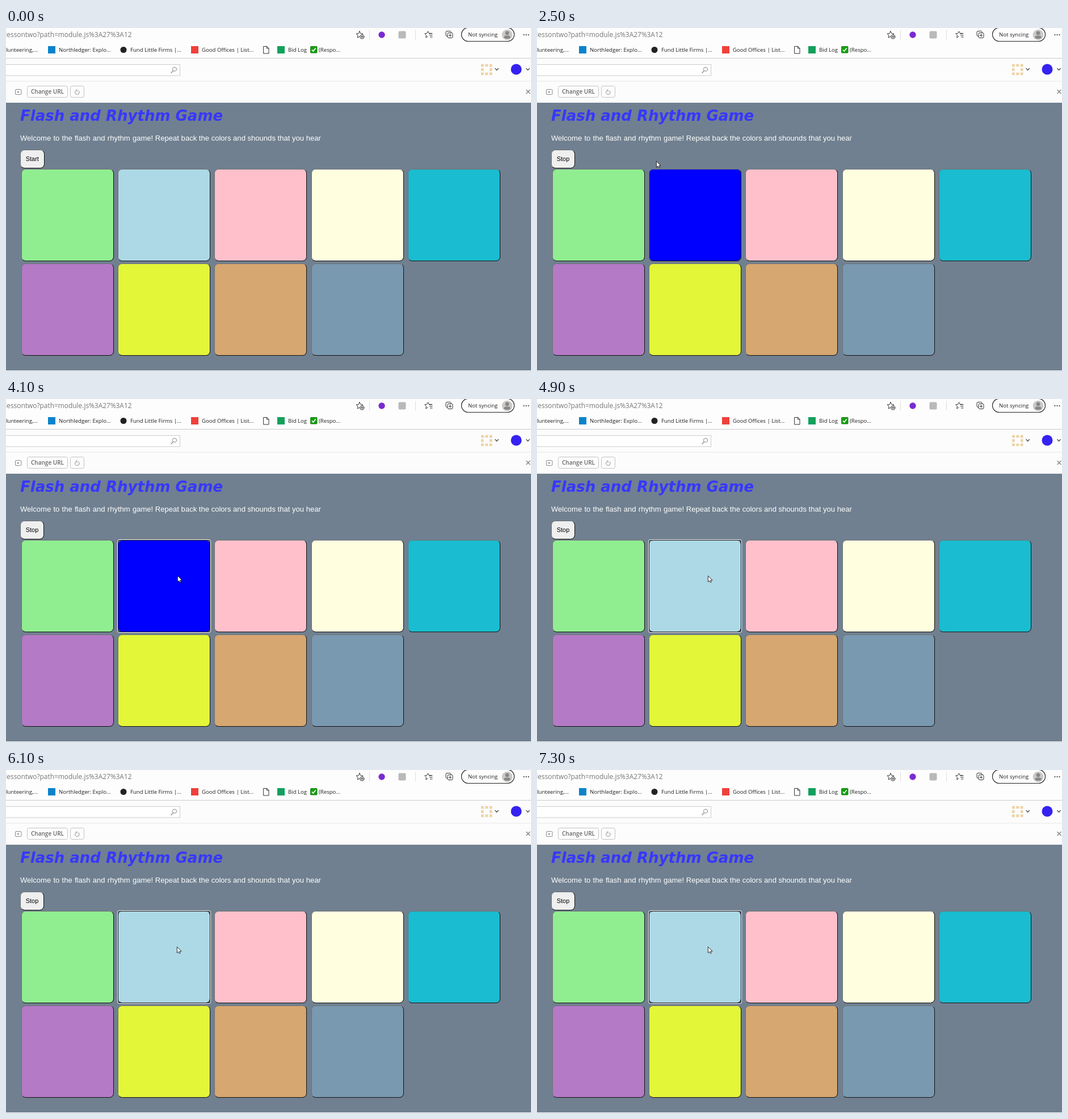
These frames come from a looping animation (925 by 606 pixels, 8 s). An HTML page:

```html
<!DOCTYPE html>
<html lang="en">
<head>
<meta charset="utf-8">
<title>Flash and Rhythm Game</title>
<style>
html, body { margin: 0; width: 100%; height: 100%; overflow: hidden; background: #fff; }
svg { display: block; }
.ui { font-family: "Open Sans", sans-serif; font-size: 9.6px; fill: #222; }
.page { font-family: "Liberation Sans", Arial, sans-serif; }
.line { fill: none; stroke: #333; stroke-linecap: round; stroke-linejoin: round; }
</style>
</head>
<body>
<svg width="925" height="606" viewBox="0 0 925 606">
  <!-- browser bars -->
  <rect width="925" height="53" fill="#fdfdfd"/>
  <rect y="53" width="925" height="79" fill="#fcfcfc"/>
  <rect y="53" width="925" height="1" fill="#c9c9c9"/>
  <rect y="93.5" width="925" height="1" fill="#e9e9e9"/>

  <g class="ui">
    <text x="221.5" y="16" text-anchor="end" style="font-size:11.9px;fill:#767676">lessontwo?path=module.js%3A27%3A12</text>
    <text x="56" y="42" text-anchor="end">olunteering,...</text>
    <text x="93" y="42">Northledger: Explo...</text>
    <text x="219" y="42">Fund Little Firms |...</text>
    <text x="345" y="42">Good Offices | List...</text>
    <text x="497" y="42">Bid Log</text>
    <text x="551" y="42">(Respo...</text>
  </g>
  <rect x="74" y="32" width="13" height="13" fill="#0a83cc"/>
  <circle cx="207" cy="38.5" r="5.5" fill="#222"/>
  <rect x="326" y="32" width="13" height="13" fill="#f0403a"/>
  <rect x="478" y="32" width="13" height="13" fill="#12a05c"/>
  <path class="line" d="M454 32.5h5.5l3.5 3.5v9h-9zM459.5 32.5v3.5h3.5"/>
  <rect x="536.5" y="32.5" width="11.5" height="11.5" rx="1" fill="#13a10e" stroke="#0c6b0a" stroke-width=".8"/>
  <path d="M539 38.5l2.3 2.5 4.3-5.5" fill="none" stroke="#fff" stroke-width="1.6"/>

  <!-- toolbar -->
  <g class="line">
    <path id="star"/>
    <circle cx="627.3" cy="15.5" r="3.6" fill="#fdfdfd"/>
    <path d="M625.4 15.5h3.8M627.3 13.6v3.8"/>
    <path d="M743 15l-3.3 2 .8-4.2-2.8-2.9 4-.5 1.8-3.6 1.800 3.600h4.700"/>
    <path d="M745.5 10h5.5M746.5 13h4.5M747.5 16h3.5"/>
    <rect x="775" y="5.5" width="9" height="9" rx="2"/>
    <rect x="778" y="8.5" width="9" height="9" rx="2" fill="#fdfdfd"/>
    <path d="M780.3 13h4.4M782.5 10.8v4.4"/>
    <path d="M640.5 4v16M721.5 4v16" stroke="#ddd"/>
    <rect x="802.5" y="-.5" width="93" height="24" rx="12" stroke="#222" stroke-width="1.2"/>
  </g>
  <circle cx="662" cy="12" r="5.7" fill="#7a2bd0"/>
  <rect x="691.5" y="5.5" width="13" height="13" rx="2" fill="#b9b9b9"/>
  <text class="ui" x="814" y="15.3">Not syncing</text>
  <circle cx="883" cy="12" r="9.3" fill="#cbc9c7"/>
  <path d="M877.3 17.5q0-4 3-4h5.4q3 0 3 4q-5.7 3-11.4 0z" fill="#8a8886"/>
  <circle cx="883" cy="9" r="3.4" fill="#8a8886"/>
  <path d="M912.5 12h9" class="line" stroke-width="2" stroke-dasharray="0 4" style="stroke:#222"/>

  <!-- page header -->
  <rect x="-5" y="64.5" width="311.5" height="19.5" fill="#fff" stroke="#ccc"/>
  <g class="line" style="stroke:#8a8a8a">
    <circle cx="297" cy="72.8" r="3.6"/>
    <path d="M294.3 75.6l-3.3 3.6" stroke-width="1.4"/>
    <path d="M862 71.5l2.7 3 2.7-3M916.8 71.5l2.7 3 2.7-3" stroke="#555" stroke-width="1.4"/>
    <path d="M917 109.5l6 6M923 109.5l-6 6" stroke-width="1.6"/>
    <rect x="16.5" y="108.5" width="10.5" height="9" rx="1.5"/>
    <path d="M20.3 111v4l3.2-2z" fill="#8a8a8a" stroke="none"/>
    <rect x="37.5" y="102.5" width="71" height="20" rx="3" style="stroke:#c4c4c4"/>
    <rect x="113.5" y="102.5" width="24" height="20" rx="3" style="stroke:#c4c4c4"/>
    <path d="M127.6 110.6a3.8 3.8 0 1 1-4.2-.2M125 108.3l-1.7 2.2 2.5 1"/>
  </g>
  <text class="ui" x="44" y="116.2" style="font-size:10px;font-weight:600;fill:#666">Change URL</text>
  <rect x="839.3" y="66" width="15" height="15" fill="none" stroke="#edd3a6" stroke-width="4.5" stroke-dasharray="5 2.5" stroke-dashoffset="2.5"/>
  <circle cx="899" cy="73" r="9.5" fill="#3522f0"/>

  <!-- game -->
  <rect y="132" width="925" height="473" fill="#708090"/>
  <text x="25" y="164" font-family="'DejaVu Sans', Verdana, sans-serif" font-size="26" font-weight="bold" font-style="italic" fill="#3737ff">Flash and Rhythm Game</text>
  <text class="page" x="25" y="198.5" font-size="13.07" fill="#fff"><tspan word-spacing=".6">Welcome to the flash and rhythm </tspan>game! Repeat back the colors and shounds that you hear</text>
  <g id="button"></g>
  <text id="label" class="page" x="34.8" y="234.8" font-size="10.9">Start</text>
  <g id="tiles"></g>
  <g id="ring" fill="none">
    <rect x="196.5" y="248.5" width="164" height="164" rx="3" stroke="#fff"/>
    <rect x="197.5" y="249.5" width="162" height="162" rx="3" stroke="#101010"/>
  </g>
  <path id="cursor" d="M0 0V10.700L2.400 8.500 4 11.700 5.800 11 4.300 7.800H7.700Z" fill="#fff" stroke="#000" stroke-width=".8"/>
</svg>
<script>
const $ = id => document.getElementById(id);

function star(cx, cy, r) {
  let d = "";
  for (let i = 0; i < 10; i++) {
    const a = i * Math.PI / 5, q = i % 2 ? r * .48 : r;
    d += (i ? "L" : "M") + (cx + q * Math.sin(a)) + " " + (cy - q * Math.cos(a));
  }
  return d + "Z";
}
$("star").setAttribute("d", star(623, 12, 6.3));

// Rounded box with a one pixel raised edge: grey at top left, black at bottom right
function raised(left, top, width, height, fill) {
  const x = left + .5, y = top + .5, w = width - 1, h = height - 1, r = x + w, b = y + h;
  return `<rect x="${x}" y="${y}" width="${w}" height="${h}" rx="7" fill="${fill}" stroke="#6f7276"/>
    <path d="M${r - 2} ${y + 2}A7 7 0 0 1 ${r} ${y + 7}V${b - 7}A7 7 0 0 1 ${r - 7} ${b}H${x + 7}A7 7 0 0 1 ${x + 2} ${b - 2}"
      fill="none" stroke="#111"/>`;
}

const colors = ["#90ee90", "#add8e6", "#ffc0cb", "#ffffe0", "#19bcd0",
                "#b47ac6", "#e4f638", "#d6a770", "#7999b0"];
$("tiles").innerHTML = colors.map((c, i) =>
  raised(Math.floor(27.2 + i % 5 * 170.3), i > 4 ? 416 : 249, 163, 163, c)).join("");
const tile = $("tiles").querySelectorAll("rect")[1];

// Pointer path: time, x, y
const path = [
  [400, 0, 34], [700, 12, 200], [800, 22, 242], [900, 34, 254], [1000, 43, 247], [1200, 50, 233],
  [1700, 50, 233], [1800, 84, 302], [1900, 98, 327], [2000, 98, 327], [2300, 150, 280],
  [2500, 210, 235], [2700, 272, 206], [2800, 288, 202], [2900, 297, 203], [3100, 227, 232],
  [3200, 227, 232], [3300, 185, 276], [3400, 185, 330], [3600, 205, 395], [3700, 225, 407],
  [3900, 280, 370], [4000, 300, 325], [4100, 302, 312], [4800, 302, 312], [4900, 301, 312], [8000, 301, 312]
];
const lit = [[2300, 3300], [4100, 4200], [5100, 6100], [6400, 7300]];

function pointer(t) {
  const i = Math.max(1, path.findIndex(p => p[0] >= t));
  const [t0, x0, y0] = path[i - 1], [t1, x1, y1] = path[i];
  const k = (t - t0) / (t1 - t0);
  return [x0 + (x1 - x0) * k, y0 + (y1 - y0) * k];
}

let started;
function draw(now) {
  const t = Math.floor(now % 8000 / 100) * 100;
  const running = t >= 1300;
  if (running !== started) {
    started = running;
    $("label").textContent = running ? "Stop" : "Start";
    $("button").innerHTML = raised(25, 215, running ? 42 : 43, 33, "#efefef");
  }
  tile.setAttribute("fill", lit.some(([a, b]) => t >= a && t < b) ? "#0000ff" : colors[1]);
  $("ring").style.display = t >= 4100 ? "" : "none";
  $("cursor").style.display = t >= 400 ? "" : "none";
  if (t >= 400) $("cursor").setAttribute("transform", `translate(${pointer(t).map(v => Math.round(v) + .4)})`);
  requestAnimationFrame(draw);
}
draw(performance.now());
</script>
</body>
</html>
```
